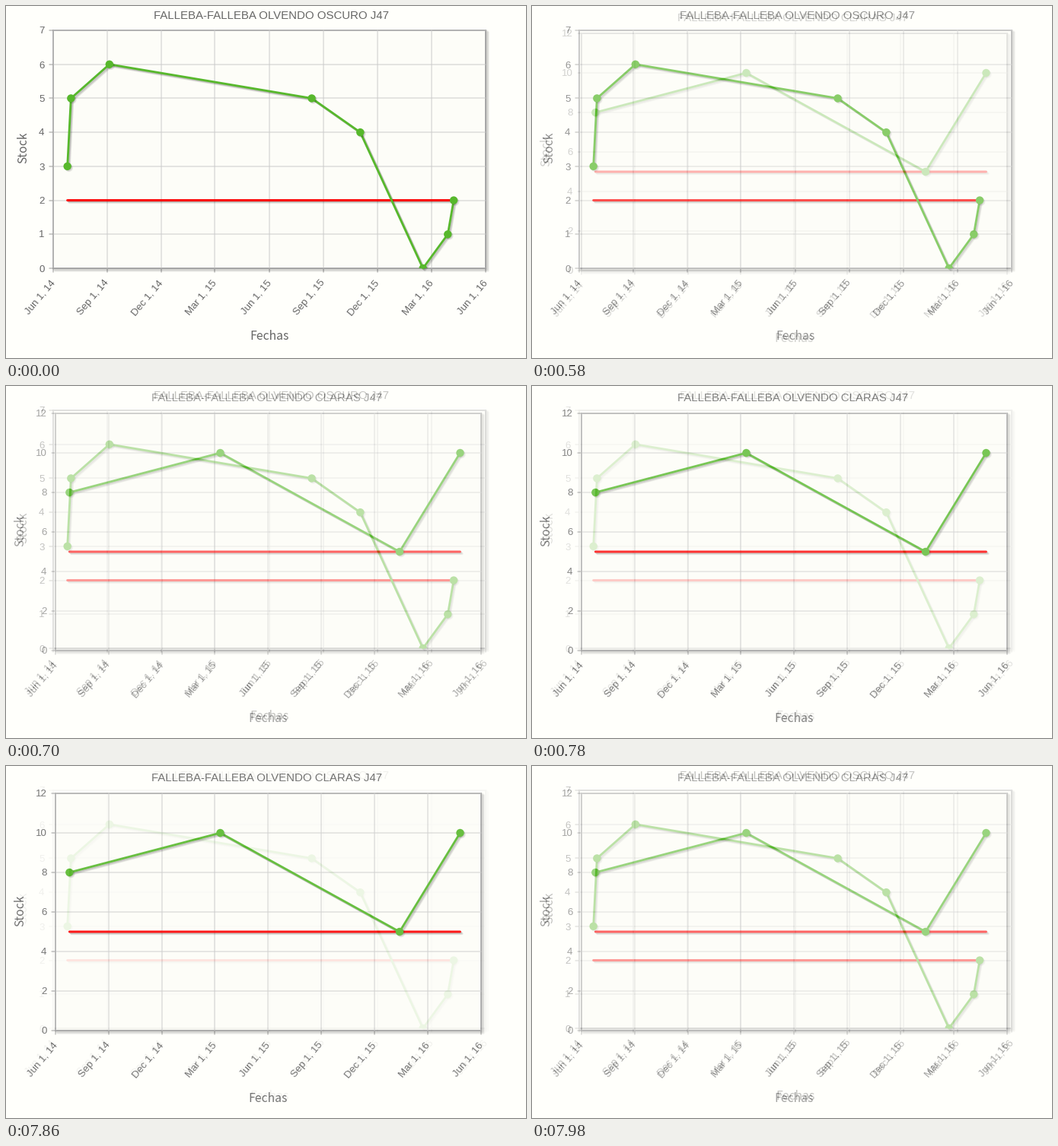
Recreate the animation shown at these times as a matplotlib script. Size 683 by 463 pixels, loop 8000 ms.

```python
import numpy as np
import matplotlib.pyplot as plt
from matplotlib.animation import FuncAnimation
from matplotlib.patches import Circle, Rectangle

W, H, DPI = 683, 463, 64
PT = 72 / DPI  # points per pixel
LOOP_MS, STEP_MS = 8000, 20
FADE_STARTS, FADE_STEP_MS, FADE_STEPS = (500, 7860), 40, 10

PAGE, PLOT = "#fffffb", "#fdfdf8"
GRID, BORDER, TEXT = "#cccccc", "#999999", "#666666"
GREEN, RED = "#57b82c", "#ff0000"
AXIS_FONT, PLAIN_FONT = "Noto Sans CJK JP", "Liberation Sans"

QUARTERS = ["Jun 1, 14", "Sep 1, 14", "Dec 1, 14", "Mar 1, 15", "Jun 1, 15",
            "Sep 1, 15", "Dec 1, 15", "Mar 1, 16", "Jun 1, 16"]
QUARTER_DAYS = np.cumsum([0, 92, 91, 90, 92, 92, 91, 91, 92])

# Stock points are (days since Jun 1, 14; units)
BROWN = dict(
    title="FALLEBA-FALLEBA OLVENDO OSCURO J47", title_pos=(349, 17),
    box=(62, 32, 630, 345), top_value=7, tick_step=1,
    points=[(24, 3), (30, 5), (95, 6), (437, 5), (519, 4),
            (625, 0), (667, 1), (677, 2)],
    minimum=2)
WHITE = dict(
    title="FALLEBA-FALLEBA OLVENDO CLARAS J47", title_pos=(343, 20),
    box=(65, 36, 624, 348), top_value=12, tick_step=2,
    points=[(24, 8), (283, 10), (591, 5), (695, 10)],
    minimum=5)


def new_axes(fig):
    fig.clf()
    ax = fig.add_axes([0, 0, 1, 1])
    ax.set(xlim=(0, W), ylim=(H, 0))
    ax.axis("off")
    return ax


def draw_chart(ax, chart):
    left, top, right, bottom = chart["box"]
    unit = (bottom - top) / chart["top_value"]

    def to_x(days):
        return left + (right - left) * np.asarray(days) / QUARTER_DAYS[-1]

    def stroke(x, y, color, width, **kw):
        return ax.plot(x, y, color=color, lw=width * PT, snap=False, **kw)[0]

    def label(x, y, text, size, font=PLAIN_FONT, ha="center", rotation=0):
        ax.text(x, y, text, family=font, size=size * PT, color=TEXT, ha=ha,
                va="baseline", rotation=rotation, rotation_mode="anchor")

    plot_area = Rectangle((left, top), right - left, bottom - top,
                          fc=PLOT, ec="none")
    ax.add_patch(plot_area)

    for x, name in zip(np.rint(to_x(QUARTER_DAYS)), QUARTERS):
        stroke([x, x], [top, bottom], GRID, 1)
        stroke([x, x], [bottom, bottom + 5], BORDER, 1)
        label(x + 2.5, bottom + 19, name, 13.3, ha="right", rotation=50)
    for value in range(0, chart["top_value"] + 1, chart["tick_step"]):
        y = round(bottom - value * unit)
        stroke([left, right], [y, y], GRID, 1)
        stroke([left - 5, left], [y, y], BORDER, 1)
        label(left - 11.5, y + 4.5, str(value), 13.2, ha="right")

    # Soft shadow along the bottom and right edges
    for i in (1, 2, 3):
        d = 1.06 * i
        stroke(np.array([left, right, right]) + d,
               np.array([bottom, bottom, top]) + d, "black", 3, alpha=0.07)
    ax.add_patch(Rectangle((left, top), right - left, bottom - top,
                           fill=False, ec=BORDER, lw=2 * PT))

    def line(x, y, color, width):
        style = dict(solid_capstyle="round", solid_joinstyle="round",
                     clip_path=plot_area)
        for i in (1, 2, 3):
            d = 0.88 * i
            stroke(x + d, y + d, "black", width, alpha=0.1, **style)
        stroke(x, y, color, width, **style)

    def dot(x, y, color, alpha=1):
        circle = Circle((x, y), 5.2, fc=color, ec="none", alpha=alpha,
                        zorder=3)
        ax.add_patch(circle)
        circle.set_clip_path(plot_area)

    days, values = np.array(chart["points"]).T
    xs, ys = to_x(days), bottom - values * unit
    line(xs[[0, -1]], np.full(2, bottom - chart["minimum"] * unit), RED, 3)
    line(xs, ys, GREEN, 2.8)
    for x, y in zip(xs, ys):
        for i in (3, 2, 1):
            dot(x + 0.7 * i, y + 0.7 * i, "black", 0.07)
        dot(x, y, GREEN)

    label(*chart["title_pos"], chart["title"], 14.95)
    label((left + right) / 2, bottom + 94, "Fechas", 15.7, font=AXIS_FONT)
    label(left - 35 - (left - 62) * 2.3, (top + bottom) / 2 - 2, "Stock", 15.7,
          font=AXIS_FONT, rotation=90)


def render(fig, chart):
    draw_chart(new_axes(fig), chart)
    fig.canvas.draw()
    return np.asarray(fig.canvas.buffer_rgba())[..., :3].astype(float)


def fade_level(t, start):
    return min(max((t - start) // FADE_STEP_MS + 1, 0), FADE_STEPS)


fig = plt.figure(figsize=(W / DPI, H / DPI), dpi=DPI, facecolor=PAGE)
brown, white = render(fig, BROWN), render(fig, WHITE)
blends = [np.rint(brown + (white - brown) * k / FADE_STEPS).astype(np.uint8)
          for k in range(FADE_STEPS + 1)]

stage = new_axes(fig)
picture = stage.imshow(blends[0], extent=(0, W, H, 0), aspect="auto",
                       interpolation="nearest")


def update(frame):
    t = frame * STEP_MS
    fade_in, fade_back = (fade_level(t, start) for start in FADE_STARTS)
    picture.set_data(blends[fade_in - fade_back])
    return (picture,)


anim = FuncAnimation(fig, update, frames=LOOP_MS // STEP_MS,
                     interval=STEP_MS, repeat=True, repeat_delay=0)
plt.show()
```
